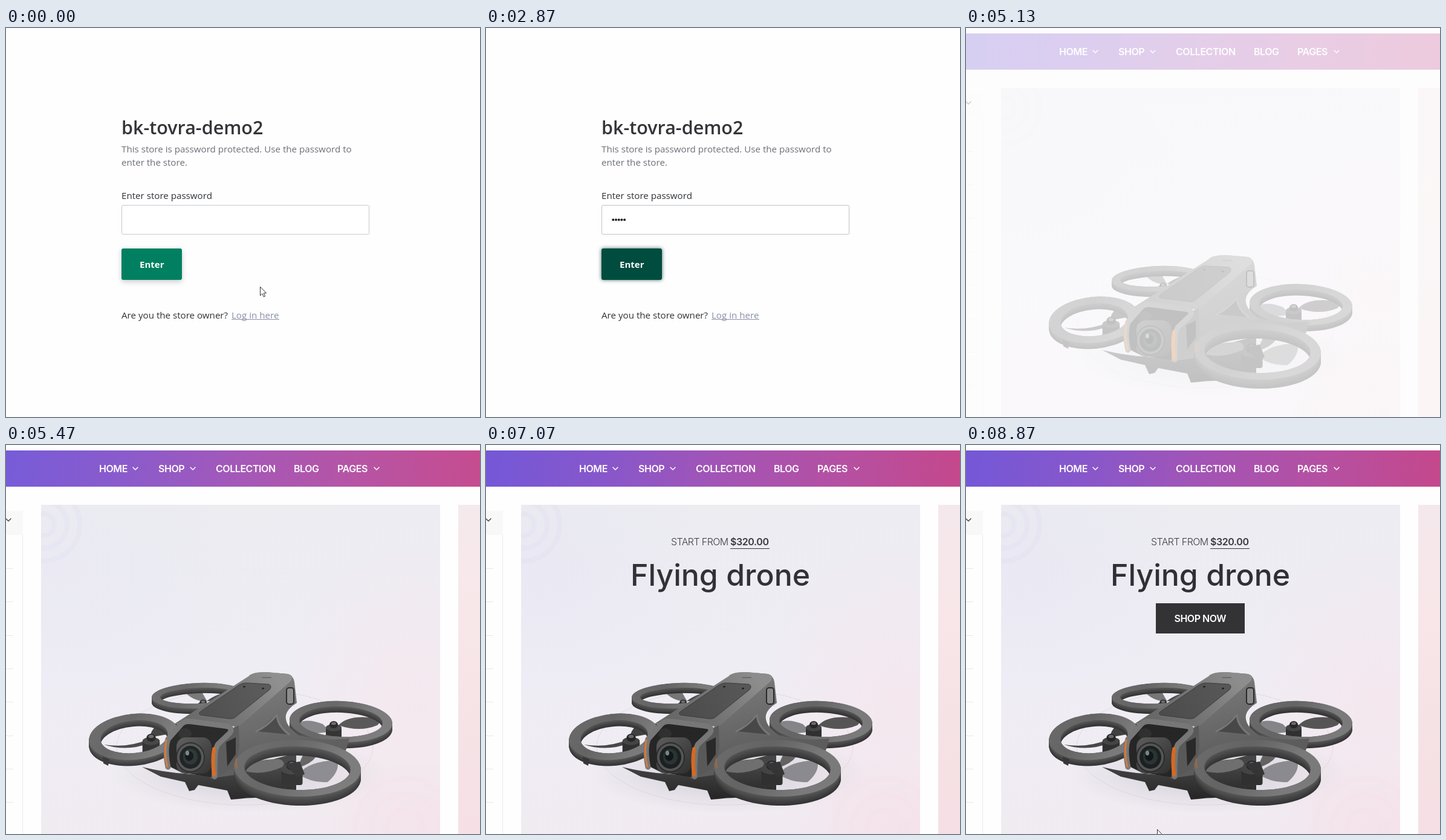
An HTML page with a canvas that plays this animation: 784x644 px, repeating every 9200 ms.

```html
<!DOCTYPE html>
<html lang="en">
<head>
<meta charset="utf-8">
<title>Store demo</title>
<style>
html, body { margin: 0; width: 100%; height: 100%; overflow: hidden; background: #fefefe; }
canvas { display: block; }
</style>
</head>
<body>
<canvas id="stage" width="784" height="644"></canvas>
<script>
const W = 784, H = 644, LOOP = 9200;
const PAPER = '#fefefe';
const OPEN = '"Open Sans", "Noto Sans", sans-serif';
const INTER = 'Inter, Roboto, sans-serif';
const stage = document.getElementById('stage').getContext('2d');
let g = stage;

const clamp = v => Math.min(1, Math.max(0, v));
const span = (t, a, b) => clamp((t - a) / (b - a));
const smooth = p => p * p * (3 - 2 * p);
const mix = (a, b, p) => a + (b - a) * p;

// CSS "ease" curve, solved by bisection
function ease(x) {
  const bez = (u, a, b) => 3 * u * (1 - u) * (1 - u) * a + 3 * u * u * (1 - u) * b + u * u * u;
  let lo = 0, hi = 1;
  for (let i = 0; i < 20; i++) {
    const m = (lo + hi) / 2;
    if (bez(m, .25, .25) < x) lo = m; else hi = m;
  }
  return bez(lo, .1, 1);
}

function text(str, x, y, font, color, spacing = 0) {
  g.font = font;
  g.letterSpacing = spacing + 'px';
  g.fillStyle = color;
  g.fillText(str, x, y);
}

function rect(x, y, w, h, color) {
  g.fillStyle = color;
  g.fillRect(x, y, w, h);
}

function fill(d, color) {
  g.fillStyle = color;
  g.fill(new Path2D(d));
}

function line(d, color, width) {
  g.strokeStyle = color;
  g.lineWidth = width;
  g.stroke(new Path2D(d));
}

function oval(x, y, rx, ry, color) {
  g.fillStyle = color;
  g.beginPath();
  g.ellipse(x, y, rx, ry, 0, 0, 7);
  g.fill();
}

function box(x, y, w, h, r) {
  g.beginPath();
  g.roundRect(x, y, w, h, r);
}

function grad(x0, y0, x1, y1, ...colors) {
  const s = g.createLinearGradient(x0, y0, x1, y1);
  colors.forEach((c, i) => s.addColorStop(i / (colors.length - 1), c));
  return s;
}

function glow(x, y, rx, ry, rgb, alpha) {
  g.save();
  g.translate(x, y);
  g.scale(rx, ry);
  const s = g.createRadialGradient(0, 0, 0, 0, 0, 1);
  s.addColorStop(0, `rgba(${rgb},${alpha})`);
  s.addColorStop(.5, `rgba(${rgb},${alpha * .55})`);
  s.addColorStop(1, `rgba(${rgb},0)`);
  g.fillStyle = s;
  g.fillRect(-1, -1, 2, 2);
  g.restore();
}

function chevron(x, y, color) {
  line(`M${x - 4} ${y - 2}l4 4l4 -4`, color, 1.5);
}

function arrow(x, y) {
  g.save();
  g.translate(x + .5, y + .5);
  const d = 'M0 0V14.5L3.4 11.4L5.8 16.6L8 15.6L5.7 10.4H10Z';
  fill(d, '#fff');
  line(d, '#333', 1);
  g.restore();
}

function beam(x, y) {
  line(`M${x - 3} ${y - 8.5}h7M${x + .5} ${y - 8.5}v17M${x - 3} ${y + 8.5}h7`, '#444', 1);
}

// Propeller guard: a flat ring, wider at the sides, extruded downwards
function hoop(x, y, rx, ry, wx, wy, depth, rot) {
  const ring = new Path2D();
  ring.ellipse(0, 0, rx, ry, rot, 0, 2 * Math.PI);
  ring.closePath();
  ring.moveTo(rx - wx, 0);
  ring.ellipse(0, 0, rx - wx, ry - wy, rot, 0, 2 * Math.PI);
  g.save();
  g.translate(x, y + depth);
  for (let k = depth; k >= 0; k--) {
    const v = Math.round(mix(88, 50, k / depth));
    g.fillStyle = `rgb(${v},${v},${v})`;
    g.fill(ring, 'evenodd');
    if (k) g.translate(0, -1);
  }
  g.fillStyle = grad(-rx, -ry, rx * .3, ry, '#6c6c6c', '#646464', '#7a7a7a');
  g.fill(ring, 'evenodd');
  g.restore();
}

function motor(x, y, s) {
  box(x - 13 * s, y, 26 * s, 20 * s, 4);
  g.fillStyle = '#303030';
  g.fill();
  oval(x, y + s, 13 * s, 6 * s, '#444');
  oval(x, y - 4 * s, 7 * s, 6 * s, '#262626');
  oval(x, y - 6 * s, 4 * s, 2.5 * s, '#6a6a6a');
}

function drone() {
  glow(400, 545, 230, 65, '100,100,115', .2);
  g.strokeStyle = 'rgba(185,185,205,.35)';
  g.lineWidth = 1;
  g.beginPath();
  g.ellipse(395, 500, 212, 96, 0, 0, 7);
  g.stroke();

  // rear left
  fill('M298 411Q312 403 324 409L333 425Q310 424 298 411Z', '#777');
  fill('M332 424Q350 410 378 407Q362 425 332 424Z', '#4a4a4a');
  fill('M284 432Q300 426 322 431L318 442Z', '#888');
  motor(326, 430, .85);
  hoop(318, 415, 77, 21, 14, 8, 9, -.04);

  // right
  fill('M482 460Q500 452 524 462L536 474Q500 484 482 460Z', '#858589');
  fill('M550 464Q566 446 610 452Q622 458 614 464Q585 476 550 464Z', '#555');
  motor(542, 467, 1);
  hoop(554, 458, 85, 34, 16, 9, 10, .04);

  // front left
  fill('M162 496Q200 502 234 488L236 494Q200 508 162 496Z', '#484848');
  fill('M238 484Q242 460 268 460Q292 460 292 474Q262 480 238 484Z', '#414141');
  motor(240, 489, 1.1);
  hoop(212, 483, 75, 38, 19, 11, 10, -.1);
  fill('M160 516L171 520L169 531L161 527Z', '#363636');

  // underside
  fill('M225 533Q262 542 296 544L338 548L480 510V592Q425 580 384 586L372 587L366 572L318 563L312 571L303 573L296 558L256 549Z',
    grad(0, 530, 0, 590, '#454545', '#232323'));

  // body side and arms
  fill('M402 382Q408 376 430 376L466 379Q475 381 477 392L481 427Q466 436 463 447Q460 464 484 480Q520 490 568 486L562 506Q480 484 420 502L386 524L380 546L338 552L345 492L384 462Z',
    grad(400, 400, 430, 520, '#787878', '#5c5c5c'));
  fill('M416 474L447 447Q446 464 466 479Z', '#484848');
  line('M414 474Q432 466 448 447Q450 466 468 479', '#777', 3);

  // top shell
  fill('M401 383Q410 375 432 376L466 379Q478 383 470 392L384 467Q330 456 278 462Z',
    grad(440, 376, 320, 460, '#8d8d8d', '#777', '#686868'));
  const panel = 'M386 397Q392 393 400 394L434 396Q441 398 436 405L380 450Q376 454 368 453L322 447Q317 445 322 441Z';
  fill(panel, grad(430, 395, 330, 450, '#585858', '#4c4c4c'));
  line(panel, '#3a3a3a', 1);
  oval(394, 400, 2, 1.5, '#222');
  oval(425, 403, 2, 1.5, '#222');
  line('M424 385h14', '#6b6b6b', 2);
  box(464, 402, 12, 27, 4);
  g.fillStyle = '#8a8a8a';
  g.fill();
  g.strokeStyle = '#292929';
  g.lineWidth = 2;
  g.stroke();

  // camera and its cage
  fill('M292 460L374 468L344 500L340 550L290 542L266 530L268 488Z', '#262626');
  oval(296, 478, 11, 9, '#303030');
  box(282, 484, 58, 60, 15);
  g.fillStyle = grad(285, 484, 335, 544, '#5c5c5c', '#303030');
  g.fill();
  oval(305, 517, 24, 25, '#2a2a2a');
  oval(305, 517, 22, 23, '#555');
  oval(305, 517, 18, 19, '#1d2021');
  oval(305, 516, 12, 13, '#2b3435');
  oval(303, 515, 7, 8, '#121717');
  oval(300, 510, 3, 4, '#78878a');
  fill('M370 472L385 464L386 500L380 532L352 548L350 496Z', '#595959');
  fill('M364 492L380 484L380 512L366 532Z', '#292929');
  line('M268 533Q262 505 268 487L290 462Q296 456 308 458L362 465Q377 467 370 477L351 495Q344 502 345 549',
    '#777', 9);
  line('M265 489Q261 512 267 532', '#d77a36', 3);
  line('M344 503Q341 523 344 546', '#d9691e', 6);

  // front right
  fill('M387 537Q404 520 452 520Q464 525 457 533Q420 550 387 537Z', '#6f6f70');
  fill('M483 534Q492 504 506 499Q518 502 513 516Q503 529 483 534Z', '#626262');
  fill('M484 545Q500 523 548 522Q553 540 532 558Q506 560 484 545Z', '#8b8b8f');
  motor(473, 536, 1.35);
  fill('M461 528L486 524L494 545L482 550Z', '#353535');
  hoop(482, 535, 105, 47, 17, 11, 15, .03);
  line('M381 520Q379 527 382 534', '#b8662c', 2);
}

function shopPage() {
  rect(0, 0, W, H, PAPER);
  rect(0, 9, W, 60, grad(0, 0, 784, 60, '#7458d7', '#8757cb', '#a354b5', '#b550a2', '#c4488c'));

  const nav = [['HOME', 154, 214], ['SHOP', 252, 309], ['COLLECTION', 347], ['BLOG', 476], ['PAGES', 548, 613]];
  for (const [label, x, tip] of nav) {
    text(label, x, 45, '600 16px ' + INTER, '#fff', -.45);
    if (tip) chevron(tip, 39, '#fff');
  }

  // sidebar
  rect(0, 109, 28, 40, '#f8f8f8');
  chevron(4, 124, '#444');
  rect(27, 149, 1, H, '#ebebeb');
  for (let i = 0; i < 8; i++) rect(0, Math.round(204 + i * 55.3), 12, 1, '#e8e8e8');

  // banner
  g.save();
  g.beginPath();
  g.rect(58, 99, 660, H);
  g.clip();
  rect(58, 99, 660, H, grad(388, 99, 440, 644, '#ececf1', '#efedf4', '#f1ebf1'));
  glow(90, 210, 300, 220, '229,227,246', .4);
  glow(680, 420, 220, 260, '249,226,234', .5);
  glow(690, 640, 200, 130, '248,214,226', .4);
  g.lineWidth = 8;
  for (let i = 0; i < 3; i++) {
    g.strokeStyle = 'rgba(214,209,236,.2)';
    g.beginPath();
    g.arc(62, 132, 18 + i * 21, 0, 7);
    g.stroke();
    g.strokeStyle = 'rgba(246,220,230,.3)';
    g.beginPath();
    g.arc(660, 634, 30 + i * 26, 0, 7);
    g.stroke();
  }
  drone();
  g.restore();

  rect(748, 99, 36, H, grad(0, 99, 0, 644, '#f4e8ec', '#f8e6e8', '#f5e2e5', '#f6dfe4'));
}

function layer(draw) {
  const c = document.createElement('canvas');
  c.width = W;
  c.height = H;
  g = c.getContext('2d');
  g.lineCap = g.lineJoin = 'round';
  draw();
  g = stage;
  return c;
}

// Fade in while rising 50px
function rise(t, start, draw) {
  const p = ease(span(t, start, start + 1000));
  if (p <= 0) return;
  g.save();
  g.globalAlpha = p;
  g.translate(0, 50 * (1 - p));
  draw();
  g.restore();
}

function shopScene(t) {
  g.drawImage(shop, 0, 0);
  rise(t, 5450, () => {
    text('START FROM', 306, 166, '300 16px ' + INTER, '#3c3c40', -.6);
    text('$320.00', 404, 166, '600 16px ' + INTER, '#3a3a3e', -.4);
    rect(404, 171, 65, 1, '#333');
  });
  rise(t, 6200, () => text('Flying drone', 239, 233, '500 50px ' + INTER, '#303034'));
  rise(t, 7130, () => {
    rect(314, 262, 147, 50, '#333336');
    text('SHOP NOW', 344.5, 293, '600 16px ' + INTER, '#fff', -.5);
  });
  if (t >= 8670) arrow(316, 636);

  const shown = t < 5270 ? mix(.28, .75, span(t, 5130, 5270)) : mix(.75, 1, span(t, 5270, 5490));
  veil(1 - shown);
}

function veil(a) {
  if (a > 0) rect(0, 0, W, H, `rgba(254,254,254,${a})`);
}

function pointer(t) {
  const a = smooth(span(t, 70, 470)), b = smooth(span(t, 470, 870));
  return [mix(mix(420, 276, a), 259, b), mix(mix(428, 392, a), 318, b)];
}

function loginScene(t) {
  const [x, y] = pointer(t);
  const body = '15.15px ' + OPEN;
  rect(0, 0, W, H, PAPER);
  text('bk-tovra-demo2', 191, 176, '600 30.5px ' + OPEN, '#333538');
  text('This store is password protected. Use the password to', 191, 206, body, '#6d7078');
  text('enter the store.', 191, 228, body, '#6d7078');
  text('Enter store password', 191, 283, body, '#303236');

  box(191.5, 293.5, 409, 48, 2);
  g.fillStyle = '#fff';
  g.fill();
  g.strokeStyle = t < 2470 ? '#c6c9cf' : '#bfc2c6';
  g.lineWidth = 1;
  g.stroke();

  const press = span(t, 2470, 2700);
  const hover = x < 291 && y > 365 ? 1 : 0;
  g.save();
  g.shadowColor = press > 0 ? `rgba(0,60,48,${mix(.25, .75, press)})` : 'rgba(60,70,80,.28)';
  g.shadowBlur = press > 0 ? 6 : 9;
  g.shadowOffsetY = mix(3, 0, press);
  box(191, 365, 100, 52, 3);
  g.fillStyle = `rgb(0,${mix(128 - 18 * hover, 76, press)},${mix(96 - 14 * hover, 63, press)})`;
  g.fill();
  g.restore();
  text('Enter', 221, 397, '700 15px ' + OPEN, '#fff');

  text('Are you the store owner?', 191, 481, body, '#303236');
  text('Log in here', 373, 481, body, '#8990a6');
  rect(373, 482, 79, 1, '#8990a6');

  const dots = t < 2000 ? 0 : Math.min(5, 1 + Math.floor((t - 2000) / 100));
  for (let i = 0; i < dots; i++) oval(210.3 + 4.7 * i, 317.5, 2, 2, '#222');
  if ((t >= 1200 && t < 1730) || (t >= 2000 && t < 2470)) rect(208 + 4.7 * dots, 310, 1, 16, '#222');

  if (t < 2000) {
    if (y < 338) beam(Math.round(x), Math.round(y));
    else arrow(Math.round(x), Math.round(y));
  }
  veil(span(t, 3830, 3930));
}

const shop = layer(shopPage);
const start = performance.now();

function frame() {
  const t = (performance.now() - start) % LOOP;
  if (t < 3930) loginScene(t);
  else if (t < 5130) rect(0, 0, W, H, PAPER);
  else shopScene(t);
  requestAnimationFrame(frame);
}
frame();
</script>
</body>
</html>
```
